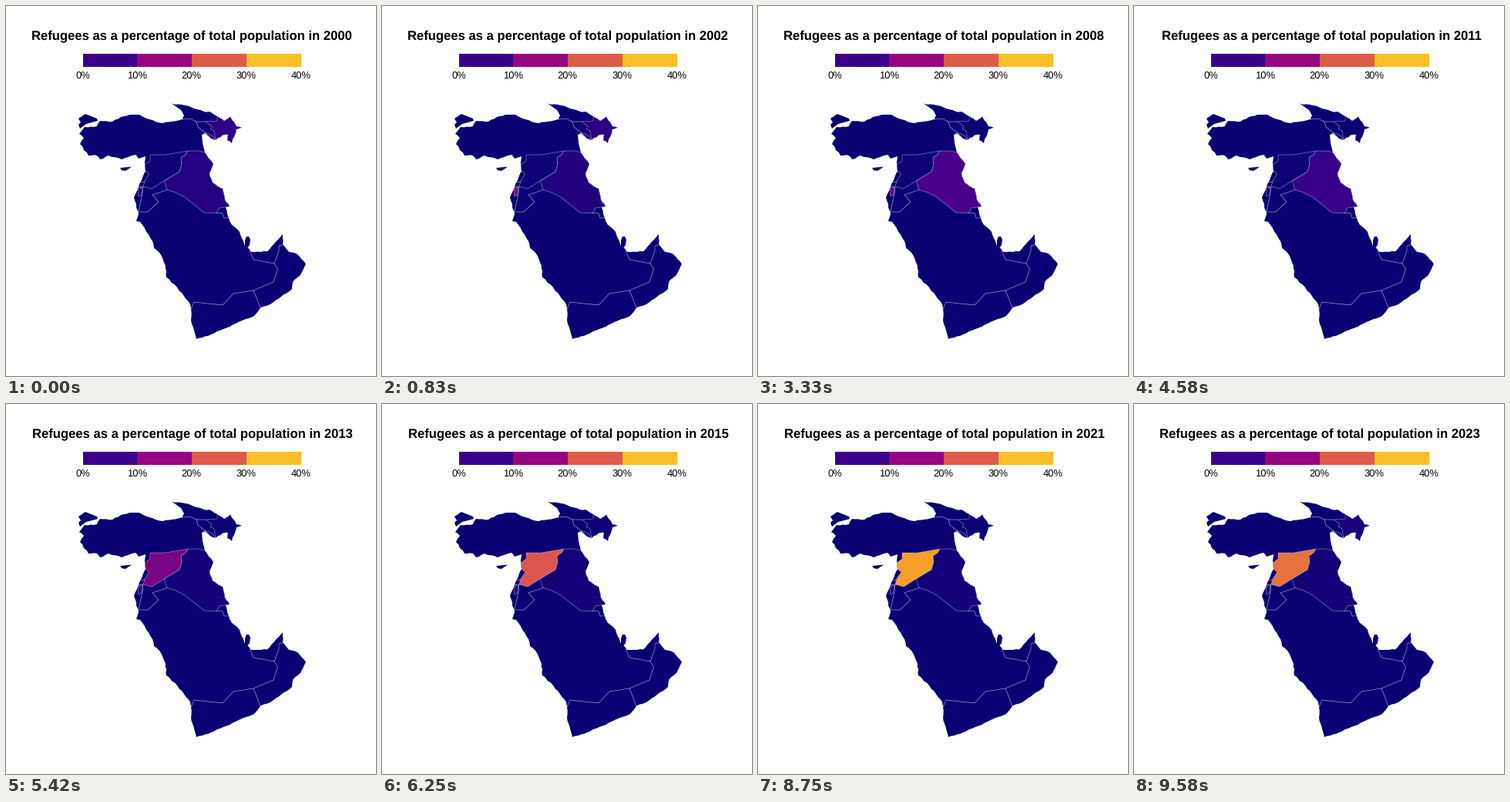
A matplotlib script for the animation above (10 s loop, 480 by 480 pixels).

```python
import matplotlib.pyplot as plt
import numpy as np
from matplotlib.animation import FuncAnimation
from matplotlib.colors import LinearSegmentedColormap
from matplotlib.patches import Polygon, Rectangle

SIZE, DPI = 480, 100
FIRST_YEAR, YEARS = 2000, 24
LOOP_MS, STEP_MS = 10000, 40
MAX_SHARE = 40
PT = 72 / DPI  # points per pixel
LINE = "#d4cfe8"

plt.rcParams["font.family"] = "Liberation Sans"
plt.rcParams["text.hinting"] = "none"

# Share of refugees (%) -> colour
STOPS = {0: "#0a0073", 5: "#3b008a", 15: "#960580", 25: "#de5b4a",
         32.5: "#f8a128", 35: "#fbbf28", 40: "#f6e626"}
RAMP = LinearSegmentedColormap.from_list(
    "share", [(v / MAX_SHARE, c) for v, c in STOPS.items()], N=1024)

# Key years and shares in percent; the years between are interpolated
SYRIA_SHARE = {2011: 0.2, 2012: 3.3, 2014: 20, 2017: 33.5, 2021: 32.3,
               2023: 27.4}
IRAQ_SHARE = {2000: 2.6, 2002: 2.4, 2005: 1.4, 2006: 5.4, 2007: 8.2,
              2008: 6.5, 2011: 4.7, 2012: 2.3, 2013: 1}
AZERI_SHARE = {2000: 3.7, 2005: 2.8, 2007: 0.2, 2022: 0.2, 2023: 1.7}
WEST_BANK_SHARE = {2000: 3.5, 2002: 13, 2004: 10.4, 2008: 9, 2009: 2.4}

rng = np.random.default_rng(4)


def rough(points, spacing=5, height=0.7):
    """Joins key points with a slightly jagged coastline."""
    points = np.array(points, float)
    line = [points[0]]
    for a, b in zip(points, points[1:]):
        length = np.hypot(*(b - a))
        normal = np.array([a[1] - b[1], b[0] - a[0]]) / length
        n = int(length / spacing) + 1
        for k in range(1, n):
            line.append(a + (b - a) * k / n
                        + normal * rng.uniform(-height, height))
        line.append(b)
    return [tuple(p) for p in line]


# Outer edge of the mainland, clockwise from the north-west
BLACK_SEA = rough([
    (102, 157), (118, 156), (122, 149), (138, 150), (149, 144), (160, 141),
    (173, 141), (186, 147), (203, 152), (229, 147), (231, 142), (227, 135),
    (215, 126.5), (236, 129.5), (257, 137), (264, 137), (274, 143)])
CASPIAN = rough([
    (274, 143), (283, 149), (291, 143.5), (299, 156), (306, 157.5),
    (299, 160), (293, 178), (287, 174), (288, 167), (281, 167.5), (272, 174)])
ARAS = [(266, 172), (258, 165), (254, 167), (255, 178)]
IRAQ_EAST = rough([
    (258, 190), (269, 205), (264, 217), (268, 229), (281, 237), (284, 251),
    (290, 260)])
GULF = rough([
    (285, 261), (289, 275), (293, 284), (303, 293), (309, 309), (318, 319),
    (339, 318.5), (359, 296), (359, 309)])
ARABIAN_SEA = rough([
    (367, 319), (378, 322), (389, 335), (382, 349), (372, 358), (371, 367),
    (357, 377), (343, 387), (330, 391.5), (322, 402), (298, 412), (282, 419),
    (262, 428), (247, 432), (240, 407), (240, 393)])
RED_SEA = rough([
    (239, 387), (222, 365), (208, 352), (207, 337), (199, 320), (192, 314),
    (190, 305), (174, 280), (169, 279)])
LEVANT = rough([
    (172, 270), (166, 249), (174, 229), (181, 214), (180, 206), (181, 195)])
TURKEY_SOUTH = rough([
    (172, 198), (168, 193), (150, 199), (133, 194), (122, 199), (118, 194),
    (107, 194), (96, 179), (101, 171), (95, 166)])
MAINLAND = (BLACK_SEA + CASPIAN + ARAS + IRAQ_EAST + GULF + ARABIAN_SEA
            + RED_SEA + LEVANT + TURKEY_SOUTH)

THRACE = [(94, 146), (103, 140), (118, 146), (119, 149), (104, 153),
          (96, 159), (94, 154), (97, 151)]
CYPRUS = [(148, 210), (163, 208.5), (155, 214), (150, 213)]
QATAR = [(310, 304), (312, 299), (315, 299), (317, 303), (316, 310),
         (313, 314), (310, 311)]

# Regions whose colour follows the data
SYRIA_IRAQ = [(236, 188), (233, 193), (227, 197), (228, 205), (225, 215),
              (205, 227)]
SYRIA = SYRIA_IRAQ + [(189, 237), (178, 234), (180, 227), (186, 218),
                      (181, 214), (180, 206), (187, 201), (187, 193),
                      (207, 193)]
IRAQ = IRAQ_EAST + [(277, 262), (273, 268.5), (257, 268), (232, 248),
                    (219, 241.5), (209, 238.5)] + SYRIA_IRAQ[::-1] + [(250, 188)]
AZERBAIJAN = [(259, 150), (274, 149)] + CASPIAN + [
    (270, 162), (265, 159), (267, 156)]
NAKHCHIVAN = [(258, 164), (268, 168), (272, 174), (266, 172)]
WEST_BANK = [(172, 237), (176.5, 235), (176.5, 242), (174.5, 246.5),
             (171, 246)]

BORDERS = [
    # Georgia, Armenia
    [(229, 147), (238, 146), (247, 150), (259, 150)],
    [(247, 150), (249, 157), (258, 164)],
    # Lebanon, Israel, Jordan
    [(174, 229), (180, 228)],
    [(171, 235), (178, 234), (176.5, 246), (172, 266)],
    [(209, 238.5), (190, 245), (198, 254), (184, 267), (171, 267)],
    # Kuwait, Emirates, Oman, Yemen
    [(273, 268.5), (281, 269), (283, 275), (289, 275)],
    [(316, 317), (321, 329), (348, 334), (354, 318), (354, 311), (359, 310)],
    [(348, 334), (352.5, 341), (347, 358), (321, 369), (330, 391.5)],
    [(321, 369), (295, 373), (281, 388), (244, 384), (240, 393)],
]


def share_color(value):
    return RAMP(value / MAX_SHARE)


def add_land(points, edge_width=0.4):
    patch = Polygon(points, facecolor=share_color(0), edgecolor=LINE,
                    linewidth=edge_width * PT, joinstyle="round")
    ax.add_patch(patch)
    return patch


fig = plt.figure(figsize=(SIZE / DPI, SIZE / DPI), dpi=DPI, facecolor="white")
ax = fig.add_axes([0, 0, 1, 1])
ax.set(xlim=(0, SIZE), ylim=(SIZE, 0))
ax.axis("off")

title = ax.text(0, 43, "", fontsize=16.6 * PT, weight="bold", color="black")

# Legend
ticks = [100 + int(70.75 * k) for k in range(5)]
for k, (left, right) in enumerate(zip(ticks, ticks[1:])):
    ax.add_patch(Rectangle((left, 62), right - left, 17, linewidth=0,
                           facecolor=share_color(5 + 10 * k)))
for k, x in enumerate(ticks):
    ax.text(x - 0.3, 94, f"{10 * k}%", ha="center", fontsize=13 * PT,
            color="black")

# Map
for shape in (MAINLAND, THRACE, CYPRUS, QATAR):
    add_land(shape, 0)
for line in BORDERS:
    ax.plot(*zip(*line), color=LINE, lw=0.5 * PT)

regions = [
    (add_land(SYRIA), SYRIA_SHARE),
    (add_land(IRAQ), IRAQ_SHARE),
    (add_land(AZERBAIJAN), AZERI_SHARE),
    (add_land(NAKHCHIVAN), AZERI_SHARE),
    (add_land(WEST_BANK), WEST_BANK_SHARE),
]


def update(i):
    end = (i + 1) * STEP_MS - 1  # last moment this picture is on screen
    year = FIRST_YEAR + end * YEARS // LOOP_MS
    title.set_text(f"Refugees as a percentage of total population in {year}")
    title.set_x(32.8 + 1.7 * str(year).count("1"))
    for patch, shares in regions:
        share = np.interp(year, list(shares), list(shares.values()))
        patch.set_facecolor(share_color(share))
    return [title] + [patch for patch, _ in regions]


anim = FuncAnimation(fig, update, frames=LOOP_MS // STEP_MS, interval=STEP_MS,
                     init_func=lambda: update(0), repeat=True, repeat_delay=0)
plt.show()
```
